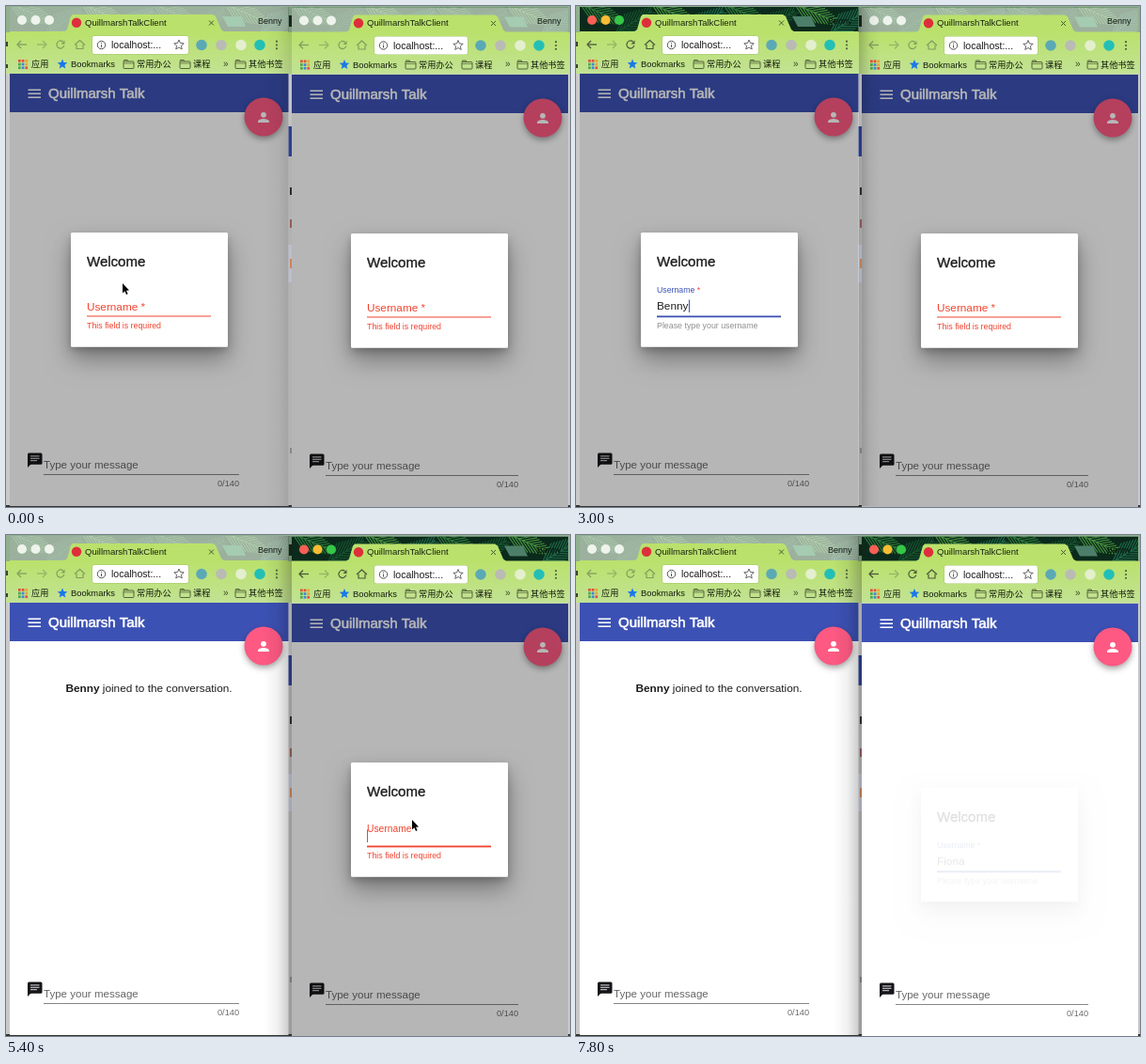
These frames come from a looping animation (600 px wide and 533 px high, 8 s). An HTML page with a canvas:

```html
<!DOCTYPE html>
<html lang="en">
<head>
<meta charset="utf-8">
<title>Two chat windows</title>
<style>
html, body { margin: 0; width: 100%; height: 100%; overflow: hidden; background: #c9c9c9; }
canvas { display: block; width: 600px; height: 533px; }
</style>
</head>
<body>
<canvas id="stage"></canvas>
<script>
const W = 600, H = 533, LOOP = 8000, STEP = 200;
const canvas = document.getElementById('stage');
const ratio = window.devicePixelRatio || 1;
canvas.width = W * ratio;
canvas.height = H * ratio;
const c = canvas.getContext('2d');

const SANS = '"Liberation Sans", Arial, sans-serif';
const CJK = '"Noto Sans CJK SC", "Noto Sans CJK", sans-serif';
const RED = '#f0432f', BLUE = '#3c51b4';
const LIME = c.createLinearGradient(0, 28, 0, 72);
LIME.addColorStop(0, '#bae16c');
LIME.addColorStop(1, '#c2e294');

const people = [
  { name: 'Benny', focus: 940, keys: [1850, 1950, 2150, 2350, 2550], close: 3337 },
  { name: 'Fiona', focus: 5320, keys: [6650, 6750, 6950, 7150, 7350], close: 7590 }
];

const clamp = v => Math.max(0, Math.min(1, v));
const easeOut = v => 1 - Math.pow(1 - clamp(v), 3);
const easeInOut = v => { v = clamp(v); return v * v * (3 - 2 * v); };
const mix = (a, b, p) => a + (b - a) * p;

function rect(x, y, w, h, fill) {
  c.fillStyle = fill;
  c.fillRect(x, y, w, h);
}

function disc(x, y, r, fill) {
  c.fillStyle = fill;
  c.beginPath();
  c.arc(x, y, r, 0, 7);
  c.fill();
}

function round(x, y, w, h, r, fill) {
  c.fillStyle = fill;
  c.beginPath();
  c.roundRect(x, y, w, h, r);
  c.fill();
}

function path(points, close) {
  c.beginPath();
  points.forEach(([x, y], i) => i ? c.lineTo(x, y) : c.moveTo(x, y));
  if (close) c.closePath();
}

function poly(points, fill) {
  path(points, true);
  c.fillStyle = fill;
  c.fill();
}

function line(points, color, width = 1) {
  path(points);
  c.strokeStyle = color;
  c.lineWidth = width;
  c.stroke();
}

function text(s, x, y, size, color, { font = SANS, weight = 400, thick = 0, align = 'left' } = {}) {
  c.font = `${weight} ${size}px ${font}`;
  c.textAlign = align;
  c.fillStyle = color;
  c.fillText(s, x, y);
  if (thick) {
    c.strokeStyle = color;
    c.lineWidth = thick;
    c.strokeText(s, x, y);
  }
  return c.measureText(s).width;
}

function shadow(color, blur, dy) {
  c.shadowColor = color;
  c.shadowBlur = blur * ratio;
  c.shadowOffsetY = dy * ratio;
}

function star(x, y, r) {
  c.beginPath();
  for (let i = 0; i < 10; i++) {
    const a = -Math.PI / 2 + i * Math.PI / 5, d = i % 2 ? r * 0.45 : r;
    c.lineTo(x + d * Math.cos(a), y + d * Math.sin(a));
  }
  c.closePath();
}

function frond(x, y, angle, len, color) {
  c.save();
  c.translate(x, y);
  c.rotate(angle);
  line([[0, 0], [len, 0]], color, 1.1);
  for (let d = 3; d < len; d += 4.5) {
    const l = 15 * (1 - d / len) + 5;
    line([[d, 0], [d + l, -l * 0.65]], color, 1.1);
    line([[d, 0], [d + l, l * 0.65]], color, 1.1);
  }
  c.restore();
}

// Tab strip with its leafy theme
function strip(active, right) {
  c.save();
  c.beginPath();
  c.rect(4, 1, right - 4, 27);
  c.clip();
  rect(4, 1, right, 27, '#0b2a1b');
  const greens = ['#2f7a3a', '#17552f', '#47903f', '#1f6a4c'];
  for (let i = 0; i < 9; i++) {
    frond(2 + i * 38, i % 2 ? 30 : -3, i % 2 ? -0.55 : 0.4, 48, greens[i % 4]);
  }
  if (!active) rect(4, 1, right, 27, 'rgba(212,228,210,.72)');
  poly([[230, 11], [250, 11], [255, 22], [236, 22]], active ? '#4c7f69' : '#a5cbb0');
  c.restore();
}

function folder(x, y) {
  c.strokeStyle = '#55633a';
  c.lineWidth = 1;
  c.beginPath();
  c.roundRect(x - 5, y - 3, 11, 7.5, 1);
  c.stroke();
  line([[x - 5, y - 3], [x - 4.4, y - 4.5], [x - 0.8, y - 4.5], [x, y - 3]], '#55633a');
  line([[x - 5, y - 1], [x + 6, y - 1]], '#55633a', 0.7);
}

function browser(active, right, shift) {
  strip(active, right);
  const lights = active ? ['#f95f55', '#f8bd33', '#35c748'] : ['#eef3ec', '#eef3ec', '#eef3ec'];
  lights.forEach((col, i) => disc(17 + i * 14.5, 15, 5, col));
  poly([[61, 28], [65, 25], [69, 11], [71, 9], [220, 9], [223, 11], [229, 25], [233, 28]], LIME);
  rect(4, 27, right - 4, 45, LIME);
  disc(75, 17.8, 5.2, '#dd2f3b');
  text('QuillmarshTalkClient', 84, 20.9, 9.5, '#17200f');
  line([[216, 15.5], [221, 20.5]], '#4a5a35');
  line([[221, 15.5], [216, 20.5]], '#4a5a35');
  text('Benny', 268 + shift, 18.6, 9, active ? '#07140c' : '#141b14');

  const ink = active ? '#4c5a3a' : '#839e5e', pale = '#98b468';
  line([[22, 41], [12, 41]], ink, 1.3);
  line([[16, 37], [12, 41], [16, 45]], ink, 1.3);
  line([[33, 41], [43, 41]], pale, 1.3);
  line([[39, 37], [43, 41], [39, 45]], pale, 1.3);
  c.strokeStyle = ink;
  c.lineWidth = 1.3;
  c.beginPath();
  c.arc(58, 41, 4, 0.3, 5.4);
  c.stroke();
  poly([[62.5, 36.5], [62.5, 40.5], [58.5, 40.5]], ink);
  line([[73, 41.5], [78.5, 36.5], [84, 41.5]], ink, 1.2);
  line([[75, 41], [75, 45.5], [82, 45.5], [82, 41]], ink, 1.2);

  round(91.5, 31.5, 103 + shift, 20, 2.5, '#a6c66b');
  round(92, 32, 102 + shift, 19, 2, '#fff');
  c.strokeStyle = '#555';
  c.lineWidth = 1;
  c.beginPath();
  c.arc(101.5, 41.5, 4.2, 0, 7);
  c.stroke();
  rect(101, 41, 1, 3, '#555');
  rect(101, 39, 1, 1, '#555');
  text('localhost:...', 112, 45.3, 10.5, '#1a1a1a');
  star(184 + shift, 41.5, 5.5);
  c.strokeStyle = '#666';
  c.stroke();

  [['#5ba9b5', 208], ['#b9bbb4', 229], ['#e3efcd', 250], ['#22bfb6', 270]]
    .forEach(([col, x]) => disc(x + shift, 41.5, 5.8, col));
  for (let i = -1; i < 2; i++) disc(288 + shift, 41.5 + i * 3.8, 1.1, '#536240');

  const dots = ['#e2513d', '#e2513d', '#eda134', '#4aa558', '#4286d6', '#eda134', '#4aa558', '#4286d6', '#e2513d'];
  dots.forEach((col, i) => rect(13 + i % 3 * 3.7, 57 + Math.floor(i / 3) * 3.7, 2.7, 2.7, col));
  const ink2 = '#141b0e', cjk = { font: CJK };
  text('应用', 27, 65, 9.2, ink2, cjk);
  star(60, 62, 5.6);
  c.fillStyle = '#1978ea';
  c.fill();
  text('Bookmarks', 69, 65, 9.4, ink2);
  folder(130, 62);
  text('常用办公', 139, 65, 9.2, ink2, cjk);
  folder(190, 62);
  text('课程', 199, 65, 9.2, ink2, cjk);
  text('»', 231, 64.5, 10, '#3d4b2a');
  folder(249, 62);
  text('其他书签', 258, 65, 9.2, ink2, cjk);
}

function fab(x) {
  c.save();
  shadow('rgba(0,0,0,.35)', 6, 3);
  disc(x, 118, 20.5, '#fd5982');
  c.restore();
  disc(x, 115.8, 2.9, '#fff');
  c.fillStyle = '#fff';
  c.beginPath();
  c.moveTo(x - 6, 124);
  c.lineTo(x - 6, 122.5);
  c.bezierCurveTo(x - 5, 119, x + 5, 119, x + 6, 122.5);
  c.lineTo(x + 6, 124);
  c.fill();
}

function chatIcon() {
  round(23, 475.5, 15.5, 12.2, 1.5, '#16161a');
  poly([[23, 477], [23, 491], [27, 487]], '#16161a');
  [478.4, 480.8, 483.2].forEach((y, i) => rect(26, y, i === 2 ? 7 : 9.5, 1, '#ddd'));
}

function page(right, shift, joined, dim) {
  rect(4, 72, right - 4, 460, '#fff');
  rect(4, 72, right - 4, 41, BLUE);
  for (let i = 0; i < 3; i++) rect(23.5, 88.5 + i * 4, 13.5, 1.5, '#fff');
  text('Quillmarsh Talk', 45, 98.4, 15, '#fff', { thick: 0.6 });
  fab(274 + shift);
  if (joined) {
    const rest = ' joined to the conversation.';
    c.font = `700 11.8px ${SANS}`;
    const nameW = c.measureText('Benny').width;
    c.font = `400 11.8px ${SANS}`;
    const x = 152 - (nameW + c.measureText(rest).width) / 2;
    text('Benny', x, 166.7, 11.8, '#1c1c1c', { weight: 700 });
    text(rest, x + nameW, 166.7, 11.8, '#1c1c1c');
  }
  chatIcon();
  text('Type your message', 40, 492, 11.55, '#666');
  rect(40, 498, 208 + shift, 1, '#858585');
  text('0/140', 248 + shift, 511, 9.2, '#6b6b6b', { align: 'right' });
  if (dim > 0) rect(4, 72, right - 4, 460, `rgba(0,0,0,${0.285 * dim})`);
}

// The shadow stays outside the card, so a fading card shows none through it
function card(x, y, w, h) {
  c.save();
  c.beginPath();
  c.rect(x - 80, y - 80, w + 160, h + 160);
  c.rect(x, y, w, h);
  c.clip('evenodd');
  shadow('rgba(0,0,0,.34)', 26, 13);
  round(x, y, w, h, 1.5, '#fff');
  shadow('rgba(0,0,0,.2)', 8, 4);
  round(x, y, w, h, 1.5, '#fff');
  c.restore();
  round(x, y, w, h, 1.5, '#fff');
}

function dialog(t, p, gone) {
  const pressed = p.keys.filter(k => k <= t);
  const typed = pressed.length;
  const focus = t >= p.focus;
  const float = easeInOut((t - p.focus) / 165);
  const tone = typed ? BLUE : RED;

  c.save();
  c.globalAlpha = 1 - gone;
  c.translate(0, 30 * gone);
  card(69, 241, 167, 121.5);
  text('Welcome', 86, 277, 15, '#1d1d1d', { thick: 0.35 });

  const size = mix(11.75, 8.75, float);
  const y = mix(323.5, 305, float);
  const w = text('Username', 86, y, size, tone);
  text(' *', 86 + w, y, size, RED);
  const valueW = text(p.name.slice(0, typed), 86, 323.3, 11.8, '#1d1d1d');
  const since = t - Math.max(p.focus, ...pressed);
  if (focus && !gone && since % 1000 < 500) {
    rect(86 + valueW + (typed ? 0.5 : 0), 312.5, 1, 13.5, tone);
  }
  rect(86, 329.5, 132, focus ? 1.8 : 1, tone);

  if (typed) {
    const slide = easeInOut((t - p.keys[0]) / 240);
    c.beginPath();
    c.rect(80, 334, 150, 16);
    c.clip();
    c.globalAlpha *= slide;
    text('Please type your username', 86, 343 - 9 * (1 - slide), 8.83, '#8f8f8f');
  } else {
    text('This field is required', 86, 343, 8.83, RED);
  }
  c.restore();
}

function chat(t, index, active) {
  const p = people[index];
  const right = index ? 298 : 300.5, shift = index ? -3 : 0;
  const gone = easeOut((t - p.close) / 400);
  c.save();
  c.translate(index * 300, index * 0.5);
  browser(active, right, shift);
  c.translate(0, index * 0.5);
  page(right, shift, !index && t >= 3700, clamp(1 - gone * 2.5));
  c.translate(index * -2, 0);
  if (gone < 1) dialog(t, p, gone);
  c.restore();
}

// Slivers of the windows lying behind
function backdrop() {
  rect(0, 0, W, H, '#c9c9c9');
  rect(0, 0, W, 28, '#8fb08e');
  rect(0, 28, W, 44, LIME);
  rect(0, 38, 2, 5, '#39442b');
  rect(0, 62, 2, 4, '#39442b');
  rect(301, 10, 3, 12, '#1c2b1c');
  rect(300, 72, 4, 56, '#dcdcdc');
  rect(300, 128, 4, 32, '#33489f');
  rect(302, 193, 2, 8, '#333');
  rect(302, 227, 2, 9, '#a4686a');
  rect(300, 254, 4, 40, '#d4d6e8');
  rect(302, 269, 2, 10, '#e0966a');
  rect(302, 470, 2, 6, '#999');
  rect(0, 531, W, 2, '#30342f');
}

function shade(from, to, alpha) {
  const g = c.createLinearGradient(from, 0, to, 0);
  g.addColorStop(0, 'rgba(0,0,0,0)');
  g.addColorStop(0.5, `rgba(0,0,0,${alpha * 0.25})`);
  g.addColorStop(1, `rgba(0,0,0,${alpha})`);
  rect(Math.min(from, to), 1, Math.abs(to - from), 531, g);
}

function pointer(t) {
  let x, y;
  if (t < people[0].keys[0]) {
    [x, y] = [124, 295];
  } else if (t >= 3750 && t < people[1].keys[0]) {
    const p = easeInOut((t - 3750) / 950), q = easeInOut((t - 4900) / 400);
    x = mix(124, 435, p) - 3 * q;
    y = mix(297, 301, p) + 2 * q;
  } else return;
  c.save();
  c.translate(x, y);
  path([[0, 0], [0, 10.5], [2.4, 8.3], [4, 12], [5.6, 11.3], [4, 7.7], [7, 7.5]], true);
  c.strokeStyle = '#fff';
  c.lineWidth = 1.4;
  c.stroke();
  c.fillStyle = '#000';
  c.fill();
  c.restore();
}

function draw(t) {
  c.setTransform(ratio, 0, 0, ratio, 0, 0);
  c.lineJoin = 'round';
  const rightOn = t >= people[1].focus;
  const leftOn = t >= people[0].focus && !rightOn;
  backdrop();
  chat(t, 0, leftOn);
  chat(t, 1, rightOn);
  if (leftOn) shade(324, 301, 0.2);
  else shade(274, 304, rightOn ? 0.24 : 0.12);
  pointer(t);
}

function tick(now) {
  draw(Math.floor(now % LOOP / STEP) * STEP);
  requestAnimationFrame(tick);
}
requestAnimationFrame(tick);
</script>
</body>
</html>
```
